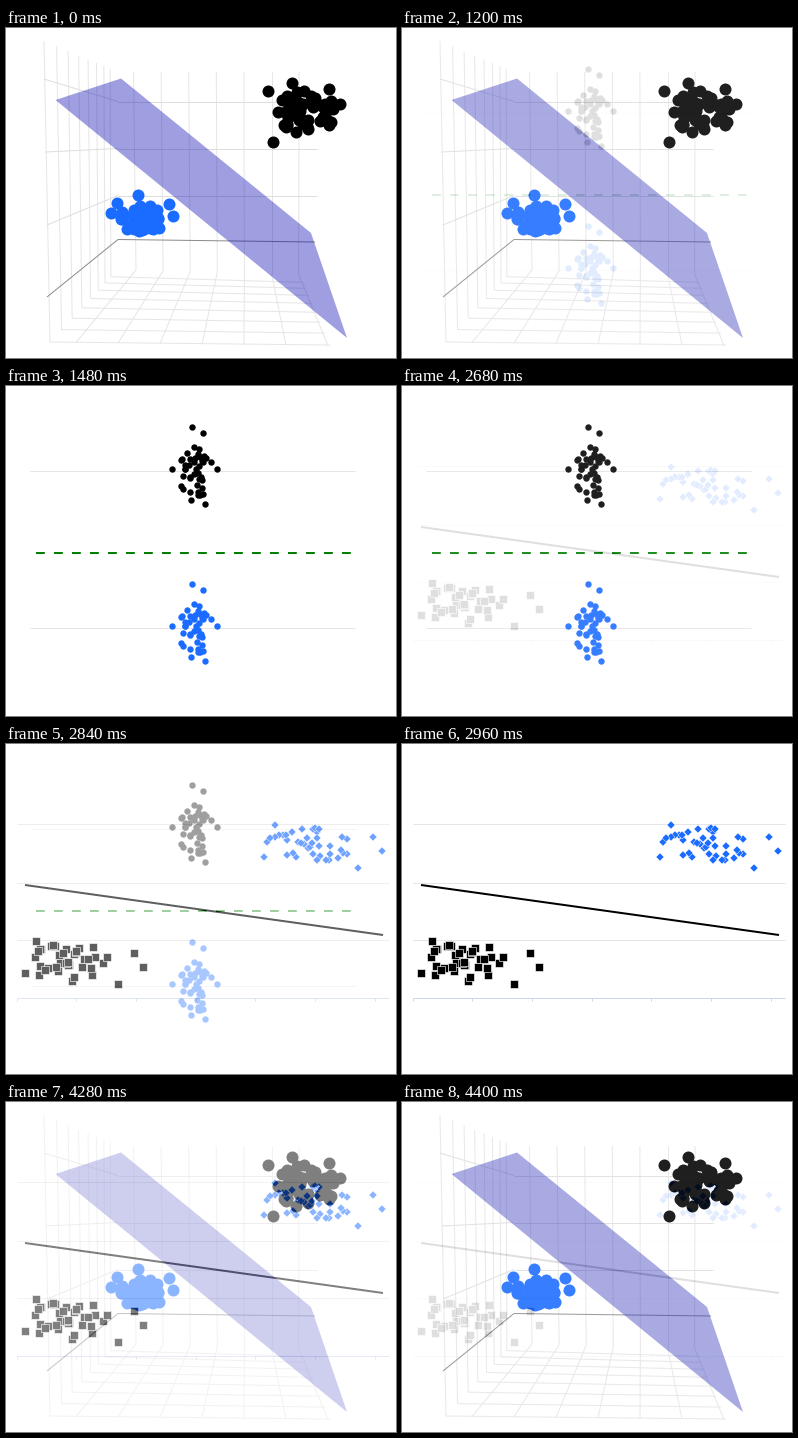
Animation of 390 by 330 pixels, one loop 4440 ms. Source, as a matplotlib script:

```python
import numpy as np
import matplotlib.pyplot as plt
from matplotlib.animation import FuncAnimation

W, H, DPI = 390, 330, 100
PX = 72 / DPI
STEP_MS, SPAN, FADE = 40, 37, 8   # frames per scene, fade length in frames
BLUE = "#1a6bff"
FAINT, WALL, RULE, AXIS, TICK = "#e6e6e6", "#dedede", "#e5e5e5", "#8c8c8c", "#ccd6eb"

fig = plt.figure(figsize=(W / DPI, H / DPI), dpi=DPI, facecolor="white")
ax = fig.add_axes([0, 0, 1, 1])


def reset():
    ax.clear()
    ax.set_xlim(0, W)
    ax.set_ylim(H, 0)
    ax.axis("off")


def line(p, q, color=FAINT, width=1.0, **kw):
    ax.plot([p[0], q[0]], [p[1], q[1]], color=color, lw=width * PX,
            solid_capstyle="butt", dash_capstyle="butt", zorder=1, **kw)


def cloud(seed, n, center, reach, *outer):
    """Centre-heavy elliptic scatter plus its outermost points."""
    rng = np.random.default_rng(seed)
    r, a = rng.random(n) ** 0.65, rng.uniform(0, 2 * np.pi, n)
    core = np.column_stack([r * np.cos(a), r * np.sin(a)])
    return np.vstack([core * reach + center, outer])


def dots(points, color, size, marker="o", edge=0):
    x, y = points.T
    ax.plot(x, y, marker, color=color, ms=size * PX, zorder=3,
            mec="white" if edge else color, mew=edge * PX)


def space_scene():
    # left wall uprights, each continuing as a row of the floor
    for j in range(8):
        x = 38 + 13.1 * j - 0.52 * j * j
        u = (112 - x) / 74
        foot = (112 - 68 * u, 241 + 73 * u)
        line((x, 44 - 31 * u), foot)
        line(foot, (294 + 30 * u, 247 + 70 * u))
    # back wall uprights, fanning out over the floor
    for j in range(7):
        back = (130 + 27.1 * j, 242 + 0.7 * j)
        line((127.5 + 27.6 * j, 44), back)
        line(back, (70 + 42 * j, 314.5 + 0.5 * j))
    for j in range(3):
        y = 73.5 + 47 * j
        line((38 + 1.5 * j, 51 + 73 * j), (112, y), WALL)
        line((112, y), (311, y), WALL)
    line((41, 269), (112, 211.5), AXIS)
    line((112, 211.5), (309, 214), AXIS)
    ax.fill([49.5, 115, 305, 341], [72, 50.5, 205, 310],
            color=(0, 0, 0.69), alpha=0.38, lw=0, zorder=2)
    dots(cloud(4, 50, (300, 84), (30, 22),
               (262, 63), (286, 55), (323, 61), (334, 76), (267, 114)),
         "black", 12)
    dots(cloud(7, 40, (135, 192), (23, 15),
               (105, 185), (111, 175), (132, 167), (163, 176), (167, 188)),
         BLUE, 12)


def column_scene():
    for y in (85, 241.5):
        line((24, y), (349, y), RULE)
    line((30, 167), (345, 167), "green", 2, dashes=(4.4, 4.6))
    column = cloud(3, 40, (188, 88), (21, 27),
                   (166, 83), (186, 41), (197, 47), (211, 83), (199, 118))
    dots(column, "black", 6.4)
    dots(column + (0, 157), BLUE, 6.4)


def plane_scene():
    for y in (79.5, 138.5, 195.5):
        line((11, y), (383, y), RULE)
    line((11, 253.5), (383, 253.5), TICK)
    for j in range(7):
        x = 10.5 + 59.7 * j
        line((x, 254), (x, 257), TICK)
    line((19, 141), (377, 191), "black", 2)
    dots(cloud(5, 38, (62, 218), (46, 19),
               (19, 229), (30, 197), (128, 209), (137, 223), (112, 240)),
         "black", 8.4, "s", 0.6)
    dots(cloud(9, 38, (304, 102), (45, 18),
               (258, 113), (269, 81), (367, 93), (376, 107), (352, 124)),
         BLUE, 5.2, "D", 0.4)


def render(scene):
    reset()
    scene()
    fig.canvas.draw()
    return np.asarray(fig.canvas.buffer_rgba())[..., :3] / 255


scenes = [render(s) for s in (space_scene, column_scene, plane_scene)]
reset()
view = ax.imshow(scenes[0], extent=(0, W, H, 0), aspect="auto",
                 interpolation="nearest")


def update(i):
    k, p = divmod(i, SPAN)
    mix = max(0, p - SPAN + FADE) / FADE
    view.set_data((1 - mix) * scenes[k] + mix * scenes[(k + 1) % 3])
    return [view]


anim = FuncAnimation(fig, update, frames=3 * SPAN, interval=STEP_MS,
                     repeat=True, repeat_delay=0, blit=False)
plt.show()
```
